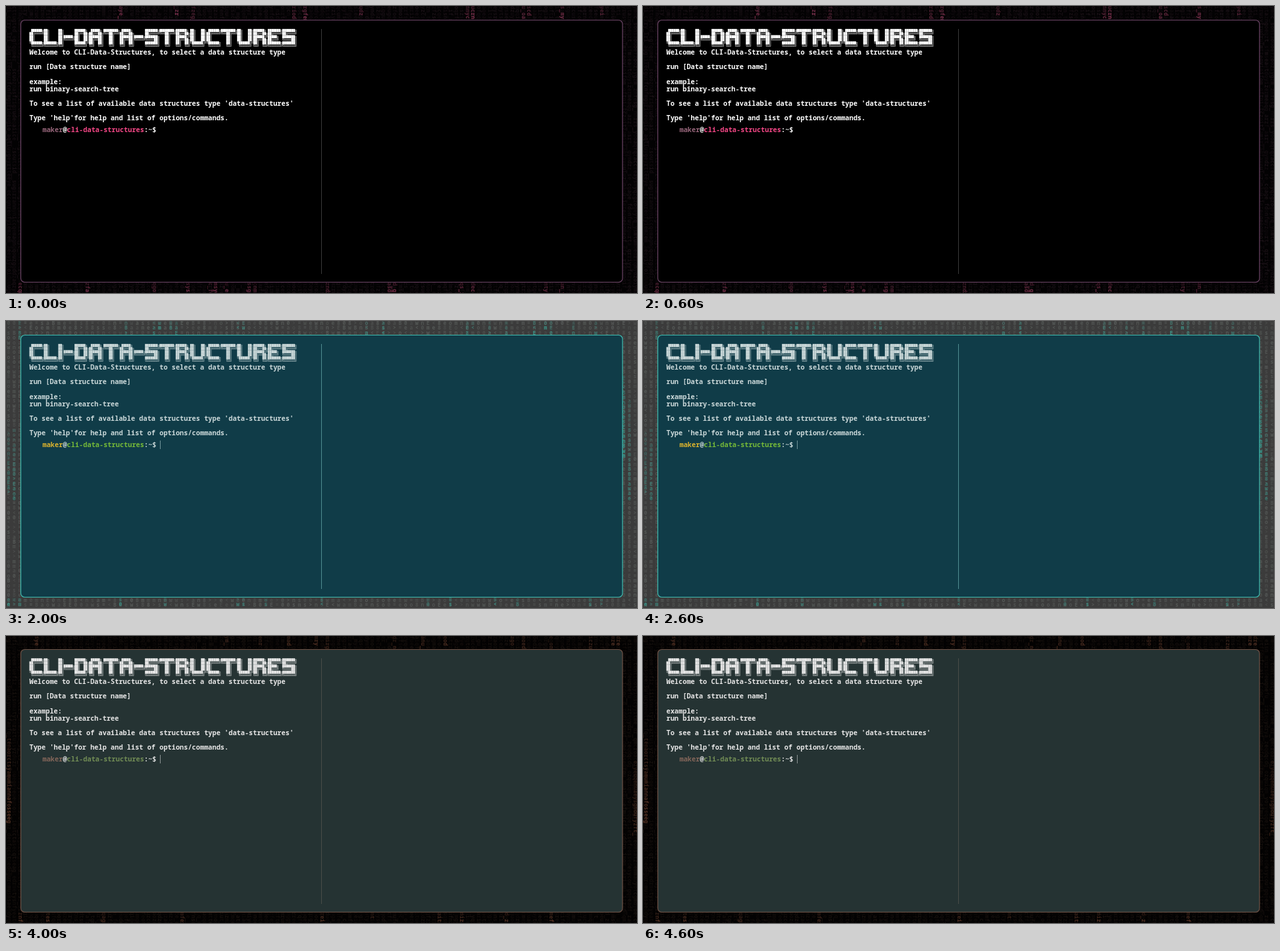
These frames come from a looping animation (959 px wide and 437 px high, 5000 ms). An HTML page with a canvas:

```html
<!DOCTYPE html>
<html lang="en">
<head>
<meta charset="utf-8">
<title>Terminal themes</title>
<style>
  html, body { margin: 0; width: 100%; height: 100%; overflow: hidden; background: #000; }
  canvas { display: block; }
</style>
</head>
<body>
<canvas id="stage" width="959" height="437"></canvas>
<script>
const ctx = document.getElementById("stage").getContext("2d");
const W = 959, H = 437, HOLD = 1000;
const MONO = '"Noto Sans Mono", "DejaVu Sans Mono", monospace';
const LETTERS = "datsrucenmgoizq_fey";

// density: chance that a column of rain is lit; turn: glyphs lie on their side
const THEMES = [
  { left: 22.5, top: 21.5, fill: "#000", border: "#6c4566", line: "#3a3a3a",
    ink: "#fff", user: "#96657a", host: "#f44786",
    bg: "#030203", dim: "#1a1116", rain: "#963a5c", chars: LETTERS, turn: true, density: 0.13 },
  { left: 25, top: 23, fill: "#2d353b", line: "#4b5458",
    ink: "#d3c6aa", user: "#e67e80", host: "#a7c080", cursor: "#778078",
    bg: "#5d5c72", dim: "#565568", rain: "#3e3e4e", chars: LETTERS, turn: true, density: 0.09, inset: 2 },
  { left: 22.5, top: 21.5, fill: "#103c48", border: "#3fbcb0", line: "#4f8c90",
    ink: "#cad8d9", user: "#dbb32d", host: "#75b938", cursor: "#6f9298",
    bg: "#3b3b3b", dim: "#565a58", rain: "#35a294", chars: "0<>oaemnw8=sBE", density: 0.16 },
  { left: 23.5, top: 22.5, fill: "#292d3e", border: "#b1d47f", line: "#77876a",
    ink: "#949dcf", user: "#f76e78", host: "#c3e88d", cursor: "#626984",
    bg: "#020302", dim: "#1b2115", rain: "#96b968", chars: "0123456789=l", density: 0.18 },
  { left: 22.5, top: 20.5, fill: "#253333", border: "#6e5246", line: "#4a4d48",
    ink: "#e6e6e6", user: "#84665a", host: "#718c55", cursor: "#8a9292",
    bg: "#030202", dim: "#17110e", rain: "#623a2a", chars: LETTERS, turn: true, density: 0.1 }
];

const LINES = [
  "Welcome to CLI-Data-Structures, to select a data structure type", "",
  "run [Data structure name]", "",
  "example:",
  "run binary-search-tree", "",
  "To see a list of available data structures type 'data-structures'", "",
  "Type 'help'for help and list of options/commands."
];

const GLYPHS = {
  C: " ██████╗|██╔════╝|██║     |██║     |╚██████╗| ╚═════╝",
  L: "██╗     |██║     |██║     |██║     |███████╗|╚══════╝",
  I: "██╗|██║|██║|██║|██║|╚═╝",
  "-": "      |      |█████╗|╚════╝|      |      ",
  D: "██████╗ |██╔══██╗|██║  ██║|██║  ██║|██████╔╝|╚═════╝ ",
  A: " █████╗ |██╔══██╗|███████║|██╔══██║|██║  ██║|╚═╝  ╚═╝",
  T: "████████╗|╚══██╔══╝|   ██║   |   ██║   |   ██║   |   ╚═╝   ",
  S: "███████╗|██╔════╝|███████╗|╚════██║|███████║|╚══════╝",
  R: "██████╗ |██╔══██╗|██████╔╝|██╔══██╗|██║  ██║|╚═╝  ╚═╝",
  U: "██╗   ██╗|██║   ██║|██║   ██║|██║   ██║|╚██████╔╝| ╚═════╝ ",
  E: "███████╗|██╔════╝|█████╗  |██╔══╝  |███████╗|╚══════╝"
};
const CORNERS = { "╗": [-1, 1], "╔": [1, 1], "╝": [-1, -1], "╚": [1, -1] };

function seeded(seed) {
  return () => (seed = (seed * 16807) % 2147483647) / 2147483647;
}

function stroke(points) {
  ctx.beginPath();
  points.forEach(p => ctx.lineTo(...p));
  ctx.stroke();
}

function drawCell(ch, x, y, w, h) {
  if (ch === "█") return ctx.fillRect(x, y, w + 0.1, h + 0.1);
  const cx = x + w / 2, cy = y + h / 2;
  for (const d of [-0.65, 0.65]) {
    if (ch === "═") stroke([[x, cy + d], [x + w, cy + d]]);
    else if (ch === "║") stroke([[cx + d, y], [cx + d, y + h]]);
    else if (CORNERS[ch]) {
      const [sx, sy] = CORNERS[ch];
      const px = cx - sx * d, py = cy - sy * d;
      stroke([[cx + sx * w / 2, py], [px, py], [px, cy + sy * h / 2]]);
    }
  }
}

function drawBanner(x, y, w, h) {
  ctx.lineWidth = 0.5;
  for (const letter of "CLI-DATA-STRUCTURES") {
    const rows = GLYPHS[letter].split("|");
    rows.forEach((row, r) => [...row].forEach((ch, c) => drawCell(ch, x + c * w, y + r * h, w, h)));
    x += rows[0].length * w;
  }
}

// Rain only shows around the panel: dim columns, some with a lit trail
function drawRain(t, rand) {
  const bottom = H - 16;
  const pitch = t.turn ? 5 : 7.4;

  function column(x, from, to, alpha) {
    for (let y = from; y < to; y += pitch) {
      const ch = t.chars[Math.floor(rand() * t.chars.length)];
      ctx.globalAlpha = alpha(y);
      ctx.save();
      ctx.translate(x, y + pitch / 2);
      if (t.turn) ctx.rotate(Math.PI / 2);
      ctx.fillText(ch, 0, 0);
      ctx.restore();
    }
  }

  function trail(x, from, length) {
    const peak = 0.5 + 0.5 * rand();
    column(x, from, from + length, y => peak * (0.45 + 0.55 * (y - from) / length));
  }

  ctx.font = "bold 8px " + MONO;
  ctx.textAlign = "center";
  for (let x = 4; x < W; x += 8.5) {
    const atSide = x < t.left || x > W - t.left;
    ctx.fillStyle = t.dim;
    column(x, 0, H, () => 0.45 + 0.55 * rand());
    ctx.fillStyle = t.rain;
    if (rand() < t.density) trail(x, 0, 10 + 14 * rand());
    if (rand() < t.density) trail(x, bottom, 9 + 9 * rand());
    if (atSide && rand() < 3 * t.density) trail(x, 70 + 120 * rand(), 70 + 80 * rand());
  }
  ctx.globalAlpha = 1;
  ctx.textAlign = "left";
}

function drawPanel({ left, top, fill, border, line }) {
  const height = H - 16.5 - top;
  ctx.beginPath();
  ctx.roundRect(left, top, W - 2 * left + 0.5, height, 6);
  ctx.fillStyle = fill;
  ctx.fill();
  if (border) {
    ctx.strokeStyle = border;
    ctx.lineWidth = 1.2;
    ctx.stroke();
  }
  ctx.fillStyle = line;
  ctx.fillRect(479, Math.round(top + 13), 1, height - 26);
}

function drawText(t) {
  const x = t.left + 13, y = t.top + 49.4;
  const size = (W - 2 * t.left) * 0.01127;
  ctx.fillStyle = ctx.strokeStyle = t.ink;
  drawBanner(x, y - 36, size * 0.2665, 4.72);
  ctx.font = `bold ${size}px ${MONO}`;
  LINES.forEach((line, i) => ctx.fillText(line, x, y + i * 11.18));

  let px = x + 20;
  const prompt = [["maker", t.user], ["@", t.ink], ["cli-data-structures", t.host], [":~$", t.ink]];
  for (const [part, color] of prompt) {
    ctx.fillStyle = color;
    ctx.fillText(part, px, y + 118.3);
    px += ctx.measureText(part).width;
  }
  if (t.cursor) {
    ctx.fillStyle = t.cursor;
    ctx.fillRect(Math.round(px + 6), Math.round(y + 111), 1, 13);
  }
}

function draw(index) {
  const t = THEMES[index], inset = t.inset || 0;
  ctx.textBaseline = "middle";
  ctx.fillStyle = "#000";
  ctx.fillRect(0, 0, W, H);
  ctx.fillStyle = t.bg;
  ctx.fillRect(inset, 0, W - 2 * inset, H);
  drawRain(t, seeded(71 + index * 977));
  drawPanel(t);
  drawText(t);
}

let shown = -1;
function tick() {
  const index = Math.floor(performance.now() / HOLD) % THEMES.length;
  if (index !== shown) draw(shown = index);
  requestAnimationFrame(tick);
}
tick();
</script>
</body>
</html>
```
